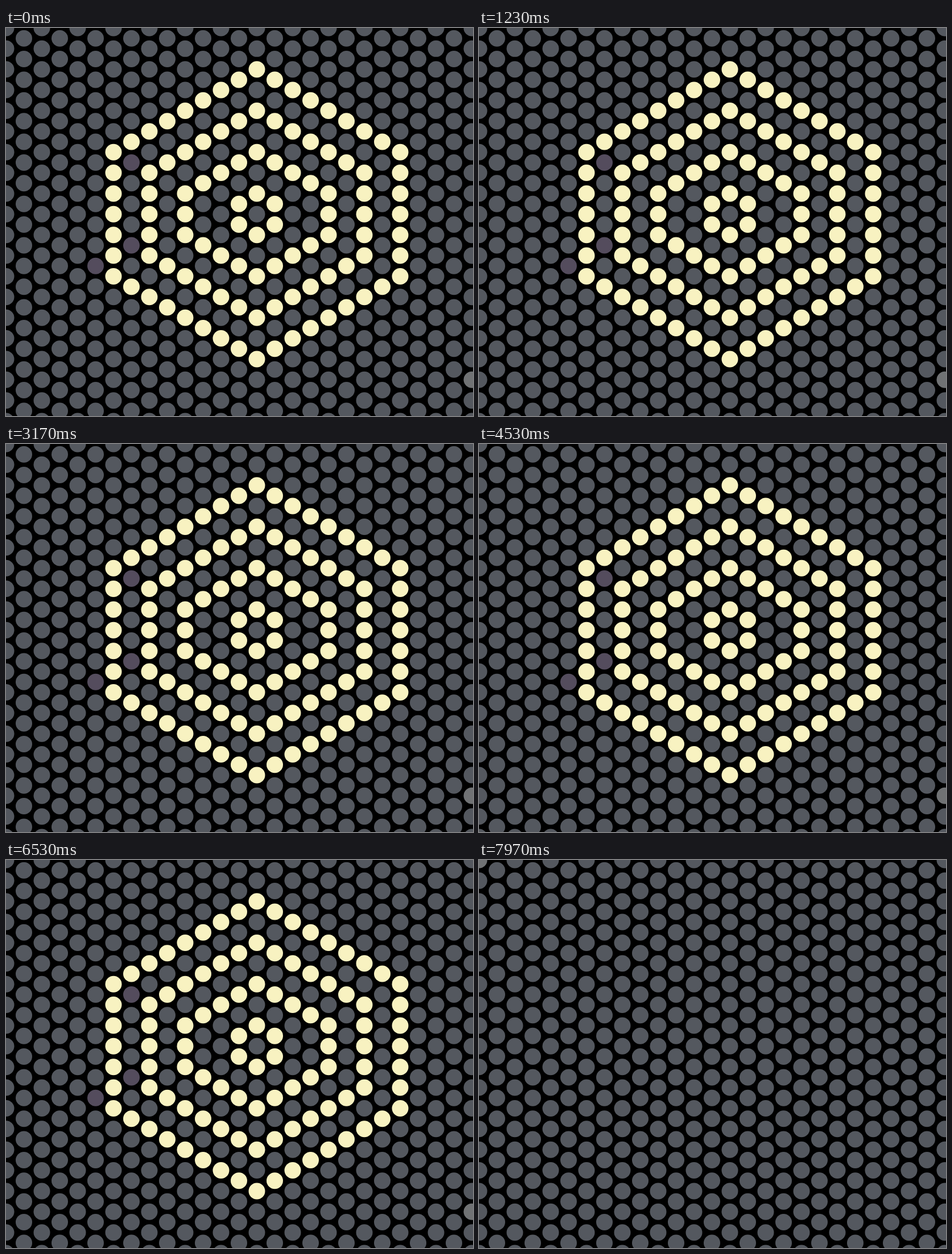
Recreate the animation shown at these times as an HTML page with a canvas. Size 821 px wide and 682 px high, loop 8 s.

```html
<!DOCTYPE html>
<html lang="en">
<head>
<meta charset="utf-8">
<title>Hexagon dots</title>
<style>
html, body { margin: 0; width: 100%; height: 100%; overflow: hidden; background: #000; }
canvas { display: block; }
</style>
</head>
<body>
<canvas id="stage" width="821" height="682"></canvas>
<script>
const ctx = document.getElementById('stage').getContext('2d');
const LOOP = 8000, CLEAR_AT = 7930;
const DX = 31.5, DY = 21 * Math.sqrt(3) / 2, RADIUS = 14.5;
const COLS = 26, ROWS = 38;
const CENTER = { col: 14, row: 18 };
const BASE = '#54585f', LIT = '#f8f2c1', PURPLE = '#544c5d', PALE = '#707274';

// Ring height in half rows, width in columns
const RINGS = [[14, 8], [10, 6], [6, 4], [2, 1]];
const TINTS = { '7,13': PURPLE, '7,21': PURPLE, '5,23': PURPLE, '26,34': PALE };

function isLit(col, row) {
  const x = Math.abs(col - CENTER.col), y = Math.abs(row - CENTER.row);
  return RINGS.some(([h, w]) => x <= w && (y === h - x || (x === w && y <= h - w)));
}

function dotColor(col, row, cleared) {
  if (cleared) return col === 0 && row === 0 ? PALE : BASE;
  return isLit(col, row) ? LIT : TINTS[col + ',' + row] || BASE;
}

function draw(cleared) {
  ctx.fillStyle = '#000';
  ctx.fillRect(0, 0, 821, 682);
  for (let col = 0; col <= COLS; col++) {
    for (let row = col % 2; row <= ROWS; row += 2) {
      ctx.fillStyle = dotColor(col, row, cleared);
      ctx.beginPath();
      ctx.arc(col * DX, row * DY, RADIUS, 0, Math.PI * 2);
      ctx.fill();
    }
  }
}

const start = performance.now();
function tick() {
  draw((performance.now() - start) % LOOP >= CLEAR_AT);
  requestAnimationFrame(tick);
}
tick();
</script>
</body>
</html>
```
